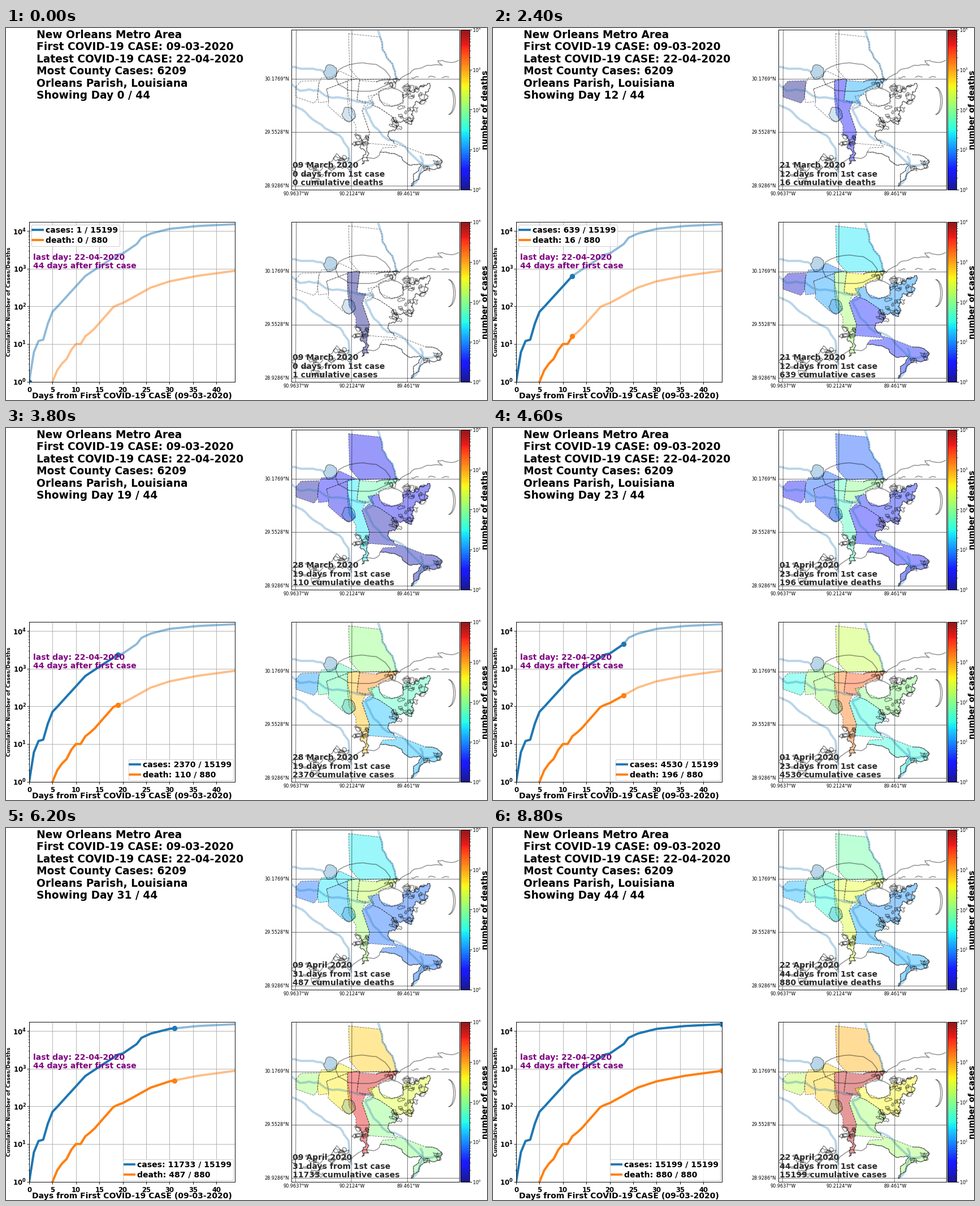
Animation of 851 by 658 pixels, one loop 9 s. Source, as a matplotlib script:

```python
import matplotlib.pyplot as plt
import numpy as np
from matplotlib.animation import FuncAnimation
from matplotlib.cm import ScalarMappable
from matplotlib.collections import LineCollection
from matplotlib.colors import LogNorm
from matplotlib.patches import Polygon

W, H, DPI = 851, 658, 84
LAST = 44
BLUE, ORANGE = "tab:blue", "tab:orange"
rng = np.random.default_rng(5)
plt.rcParams["font.family"] = "DejaVu Sans"
fig = plt.figure(figsize=(W / DPI, H / DPI), dpi=DPI, facecolor="white")


def box(x0, y0, x1, y1):
    """Axes from pixel edges, y counted from the top."""
    return fig.add_axes([x0 / W, 1 - y1 / H, (x1 - x0) / W, (y1 - y0) / H])


def label(x, y, text, size=12, weight="bold", **kw):
    return fig.text(x / W, 1 - y / H, text, fontsize=size, weight=weight, **kw)


def path(*xy):
    return np.reshape(xy, (-1, 2)).astype(float)


def rough(pts, amp=0.25, depth=2):
    """Midpoint displacement that makes a line look like a shore."""
    for _ in range(depth):
        step = np.diff(pts, axis=0)
        shift = step[:, ::-1] * [1, -1] * rng.uniform(-amp, amp, (len(step), 1))
        out = np.empty((2 * len(pts) - 1, 2))
        out[::2] = pts
        out[1::2] = pts[:-1] + step / 2 + shift
        pts = out
    return pts


def ring(cx, cy, rx, ry, jitter=0.12, n=12):
    """Closed ragged ellipse."""
    ang = np.linspace(0, 2 * np.pi, n + 1)
    r = 1 + rng.uniform(-jitter, jitter, n + 1)
    r[-1] = r[0]
    return rough(np.c_[cx + rx * r * np.cos(ang), cy + ry * r * np.sin(ang)],
                 jitter, 1)


def marsh(x0, y0, x1, y1, count):
    """Small ragged islands scattered over a box."""
    return [ring(rng.uniform(x0, x1), rng.uniform(y0, y1),
                 rng.uniform(2, 7), rng.uniform(1.5, 4.5), 0.5, 8)
            for _ in range(count)]


def daily(*day_total):
    """Cumulative totals growing exponentially between key days."""
    day, total = path(*day_total).T
    curve = 10 ** np.interp(np.arange(LAST + 1), day, np.log10(total))
    return np.where(np.arange(LAST + 1) < day[0], 0, np.rint(curve)).astype(int)


days = np.arange(LAST + 1)
cases = daily(0, 1, 1, 6, 2, 12, 3, 13, 4, 35, 5, 72, 6, 97, 12, 639, 15, 1130,
              19, 2370, 20, 2520, 23, 4530, 24, 6600, 26, 8571, 30, 11400,
              36, 13553, 44, 15199)
deaths = daily(5, 1, 6, 2, 10, 10, 11, 10, 12, 16, 14, 26, 18, 96, 19, 110,
               20, 122, 26, 315, 30, 460, 36, 645, 44, 880)

# Map geometry, in pixels of the upper map
pearl = rough(path(662, 16, 666, 38, 674, 53, 684, 64, 688, 76, 693, 91), 0.12, 1)
bernard_coast = rough(path(714, 109, 746, 98, 742, 128, 722, 145, 722, 160,
                           708, 168, 685, 158), 0.4, 4)
bay_coast = rough(path(685, 158, 692, 167, 682, 182, 686, 204), 0.4, 3)
delta_coast = rough(path(742, 224, 771, 237, 766, 248, 740, 252, 717, 280,
                         735, 243, 716, 243, 700, 228, 662, 219), 0.2, 3)
jefferson_coast = rough(path(640, 205, 642, 222, 630, 241, 637, 222, 630, 202,
                             619, 190), 0.3, 3)

st_tammany = np.vstack([path(606, 10), pearl,
                        path(672, 90, 625, 92, 608, 72)])
jefferson = np.vstack([path(604, 92, 626, 90, 621, 128, 637, 130, 630, 146,
                            643, 184), jefferson_coast,
                       path(619, 172, 607, 152, 604, 124)])
orleans = path(625, 93, 655, 95, 672, 90, 695, 91, 682, 104, 665, 108,
               646, 124, 651, 134, 630, 131, 621, 126)
st_bernard = np.vstack([path(660, 141, 650, 137, 640, 121, 659, 117, 662, 130,
                             683, 138, 703, 133, 703, 112), bernard_coast])
plaquemines = np.vstack([path(690, 208, 640, 204, 643, 184, 630, 146, 642, 134,
                              660, 141), bay_coast, path(706, 210),
                         delta_coast, path(667, 212, 690, 211)])
st_james = path(513, 104, 522, 94, 554, 93, 551, 125, 545, 133, 513, 122)
st_john = path(551, 118, 553, 100, 558, 88, 577, 87, 590, 76, 620, 90, 604, 94,
               567, 108, 571, 130, 553, 132)
st_charles = path(567, 108, 604, 94, 605, 115, 611, 144, 618, 158, 606, 167,
                  595, 160, 570, 138, 571, 122)

# Outline, then for cases and for deaths:
# first day, final position on the colour scale, growth against the total
PARISHES = [
    (st_tammany, (4, .73, 1.1), (16, .46, 1.6)),
    (jefferson, (0, .945, 1.17), (9, .61, 1.15)),
    (orleans, (1, .948, .88), (5, .625, .79)),
    (st_bernard, (6, .65, 1.12), (17, .26, .7)),
    (plaquemines, (9, .54, 1.15), (18, .29, 1.1)),
    (st_james, (11, .575, 1.5), (10, .30, 1.2)),
    (st_john, (6, .69, 1.27), (16, .435, 1.4)),
    (st_charles, (5, .69, 1.2), (15, .39, 1.3)),
]
RIVERS = [np.vstack([path(658, 3), pearl])] + [rough(p, 0.1) for p in (
    path(504, 69, 530, 72, 547, 73, 563, 78),
    path(504, 98, 520, 111, 553, 110, 568, 121, 606, 126, 627, 131, 647, 130,
         650, 135, 636, 144, 645, 163, 676, 198, 706, 210, 738, 243, 718, 280),
    path(733, 226, 738, 243, 768, 238),
    path(504, 136, 530, 149, 558, 171, 590, 190, 606, 213, 611, 256),
)]
LAKES = [ring(574, 78, 11, 13), ring(607, 153, 12, 14)]

bow = np.linspace(0, np.pi, 12)
shores = [
    bernard_coast, bay_coast, delta_coast, jefferson_coast,
    ring(631, 87, 48, 26, 0.05),
    ring(682, 122, 23, 17, 0.1),
    rough(path(655, 96, 675, 92, 697, 92), 0.15),
    rough(path(694, 94, 706, 84, 722, 73, 745, 66, 772, 66, 764, 58, 780, 60,
               801, 57), 0.12),
    rough(path(553, 260, 560, 243, 585, 222, 608, 252, 645, 230, 662, 219)),
]
shores += [np.c_[783 + bulge * np.sin(bow), 129 - 24 * np.cos(bow)]
           for bulge in (9, 12)]
shores += [rough(path(x, 88, x + 13, 87)) for x in (717, 747, 771)]
for area in ((704, 100, 744, 140, 14), (696, 140, 726, 168, 8),
             (682, 160, 700, 182, 4), (614, 188, 642, 208, 9),
             (508, 238, 560, 274, 11), (562, 224, 602, 250, 8),
             (742, 236, 766, 254, 5), (676, 92, 698, 102, 4)):
    shores += marsh(*area)

norm = LogNorm(1, 1e4)
jet = plt.get_cmap("jet")


def draw_map(top, kind):
    """Static map with its colour bar; returns the parish patches and text."""
    shift = top - 3
    ax = box(504.5, top, 801.5, top + 283)
    ax.set(xlim=(504.5, 801.5), ylim=(286, 3), xticks=[], yticks=[])
    patches = []
    for outline, *_ in PARISHES:
        patch = ax.add_patch(Polygon(outline, fc="none", ec="none", zorder=1))
        ax.add_patch(Polygon(outline, fc="none", ec=(0, 0, 0, .6), lw=.7,
                             ls=(0, (4, 2)), zorder=2))
        patches.append(patch)
    for lake, alpha in zip(LAKES, (.3, .2)):
        ax.add_patch(Polygon(lake, fc=(.12, .47, .71, alpha),
                             ec=(0, 0, 0, .5), lw=1, zorder=3))
    ax.add_collection(LineCollection(RIVERS, colors=BLUE, alpha=.3,
                                     linewidths=3.4, zorder=3))
    ax.add_collection(LineCollection(shores, colors="black", alpha=.42,
                                     linewidths=1.3, zorder=4))
    grid = dict(color="black", alpha=.65, lw=.7, zorder=5)
    for x, name in ((513, "90.9637"), (611.5, "90.2124"), (711, "89.461")):
        ax.plot([x + .5, x - .5], [3, 286], **grid)
        label(x + .5, 293 + shift, name + "°W", 7, "normal",
              ha="center", va="center")
    for y, name in ((90.5, "30.1769"), (184.5, "29.5528"), (279, "28.9286")):
        ax.plot([504, 802], [y, y], **grid)
        label(501, y + shift, name + "°N", 7, "normal",
              ha="right", va="center")

    cax = box(804, top, 820, top + 283)
    fig.colorbar(ScalarMappable(norm, jet), cax=cax, alpha=.9)
    cax.tick_params(labelsize=7, pad=.8)
    label(847.5, top + 141.5, f"number of {kind}", rotation=90,
          ha="center", va="center")
    notes = [label(507, 247 + shift + 15.5 * i, "", color="#2b2b2b")
             for i in range(3)]
    return patches, notes


# Heading
for i, line in enumerate(("New Orleans Metro Area",
                          "First COVID-19 CASE: 09-03-2020",
                          "Latest COVID-19 CASE: 22-04-2020",
                          "Most County Cases: 6209",
                          "Orleans Parish, Louisiana")):
    label(53.5, 18 + 21.4 * i, line, 16)
day_note = label(53.5, 125, "", 16)

# Curves
ax = box(41, 343, 405.3, 625.5)
ax.set_yscale("log")
ax.set(xlim=(0, LAST), ylim=(1, 10 ** (282.5 / 66.6)))
ax.set_xticks(range(0, 45, 5))
ax.set_yticks(10.0 ** np.arange(5),
              labels=[rf"$\mathbf{{10^{{{i}}}}}$" for i in range(5)])
ax.tick_params(labelsize=10)
ax.tick_params(axis="y", pad=1)
plt.setp(ax.get_xticklabels(), weight="bold")
ax.grid(True)
label(222.5, 655.5, "Days from First COVID-19 CASE (09-03-2020)", ha="center")
label(5, 484, "Cumulative Number of Cases/Deaths", 8, rotation=90,
      ha="center", va="center")
label(48, 410, "last day: 22-04-2020", color="purple")
label(48, 425.5, "44 days after first case", color="purple")

curves = []
for total, color in ((cases, BLUE), (deaths, ORANGE)):
    values = np.where(total > 0, total, np.nan)
    ax.plot(days, values, color=color, lw=3.3, alpha=.5)
    line, = ax.plot([], [], color=color, lw=3.3)
    dot, = ax.plot([], [], "o", color=color, ms=7)
    curves.append((values, line, dot))

maps = [(*draw_map(3, "deaths"), deaths, "deaths", 2),
        (*draw_map(343, "cases"), cases, "cases", 1)]


def parish_color(day, total, first, final, growth):
    if day < first:
        return "none"
    behind = np.log10(total[-1] / max(total[day], 1)) / 4
    return jet(max(0.0, final - growth * behind), alpha=.4)


def update(day):
    day_note.set_text(f"Showing Day {day} / {LAST}")
    for values, line, dot in curves:
        line.set_data(days[:day + 1], values[:day + 1])
        dot.set_data([day], [values[day]])
    ax.legend([c[1] for c in curves],
              [f"cases: {cases[day]} / {cases[-1]}",
               f"death: {deaths[day]} / {deaths[-1]}"],
              loc="upper left" if cases[day] < 1000 else "lower right",
              bbox_to_anchor=(0, -.005, 1, 1),
              prop={"weight": "bold", "size": 12}, borderpad=.2,
              borderaxespad=.25, handlelength=1.25, handletextpad=.35,
              labelspacing=.3)

    date = f"{day + 9:02d} March 2020" if day < 23 else f"{day - 22:02d} April 2020"
    for patches, notes, total, kind, column in maps:
        notes[0].set_text(date)
        notes[1].set_text(f"{day} days from 1st case")
        notes[2].set_text(f"{total[day]} cumulative {kind}")
        for patch, parish in zip(patches, PARISHES):
            patch.set_facecolor(parish_color(day, total, *parish[column]))


anim = FuncAnimation(fig, update, frames=LAST + 1, interval=200,
                     init_func=lambda: update(0), repeat=True, repeat_delay=0)
plt.show()
```
